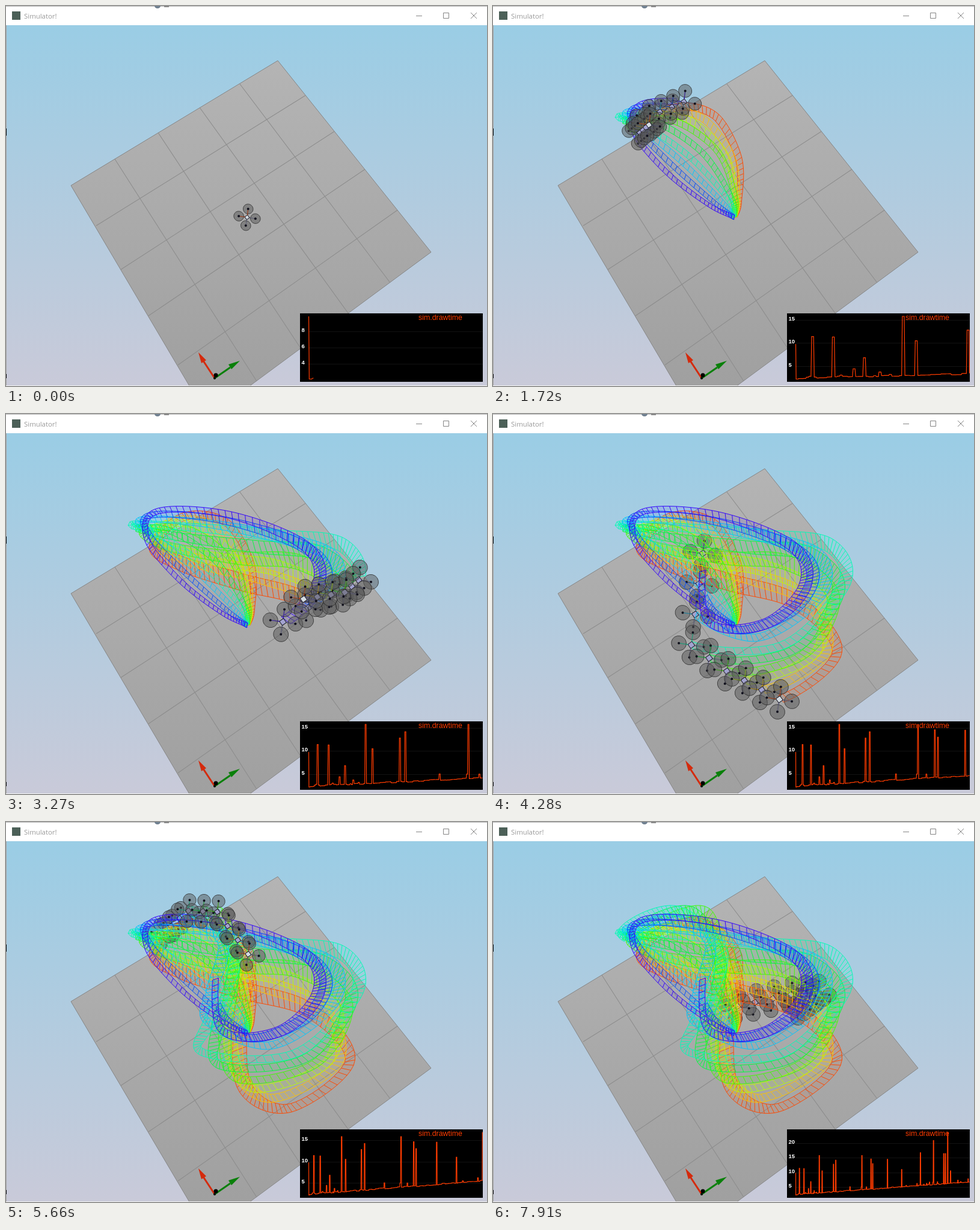
Animation of 800x633 px, one loop 7.99 s. Source, as an HTML page with a canvas:

```html
<!DOCTYPE html>
<html lang="en">
<head>
<meta charset="utf-8">
<title>Simulator</title>
<style>
  html, body { margin: 0; width: 100%; height: 100%; overflow: hidden; background: #fff; }
  svg, canvas { position: absolute; left: 0; top: 0; width: 800px; height: 633px; }
</style>
</head>
<body>
<svg viewBox="0 0 800 633">
  <defs>
    <linearGradient id="sky" x1="0" y1="0" x2="0" y2="1">
      <stop offset="0" stop-color="#9acde5"/><stop offset="1" stop-color="#c9cad9"/>
    </linearGradient>
    <linearGradient id="floor" x1="0" y1="0" x2="0" y2="1">
      <stop offset="0" stop-color="#b4b4b4"/><stop offset="1" stop-color="#9e9e9e"/>
    </linearGradient>
  </defs>
  <rect width="800" height="633" fill="#fff"/>
  <path d="M0 .5H800" stroke="#b5b5b5"/>
  <path d="M247 0a5 4 0 0 0 10 0z" fill="#708090"/>
  <path d="M263 1h8" stroke="#888" stroke-width="2"/>
  <rect x="10" y="9" width="14" height="14" fill="#4c6058"/>
  <text x="30" y="21" font-family="'Open Sans', sans-serif" font-size="11.4" fill="#999">Simulator!</text>
  <path d="M682 16.5h10M727.5 11.5h9v9h-9zM773 11l10 10M783 11l-10 10" fill="none" stroke="#858585"/>
  <rect y="32" width="800" height="600" fill="url(#sky)"/>
  <path d="M452 91L707 410L335.500 684.600L108 299Z" fill="url(#floor)" stroke="#858585"/>
  <path d="M389 130L639 461M322 169L570 513M253 211L490 570M181 255L417 625
           M150 366L498 149M191 439L546 209M237 516L597 272M286 598L651 340" fill="none" stroke="#8d8d8d" stroke-width="1.100"/>
  <path d="M347 620L328 591" stroke="#d42a0c" stroke-width="3"/>
  <path d="M320 577L333 590L325 595Z" fill="#d42a0c"/>
  <path d="M347 620L373 602" stroke="#0a800a" stroke-width="3"/>
  <path d="M389 591L375 605L370 597Z" fill="#0a800a"/>
  <circle cx="349" cy="615" r="3.500"/><circle cx="347" cy="620" r="2"/>
  <path d="M.5 32V632" stroke="#a5a5a5"/>
  <path d="M0 632.5H800" stroke="#f1f1f1"/>
  <path d="M0 204h1v12h-1zM0 613h1v7h-1z"/>
</svg>
<canvas id="view" width="800" height="633"></canvas>
<script>
const ctx = document.getElementById('view').getContext('2d');
const LOOP = 7990, STEP = 77.6, COUNT = 9;

// Waypoint times, then x,y waypoints for four flyers; the others blend between neighbours.
const times = [0, 350, 700, 1020, 1450, 1900, 2350, 2830, 3310, 3800, 4280, 4740, 5200, 5660, 6290, 6920, 7410, 7910];
const routes = [
  { id: 0, p: [401,352, 409,325, 408,252, 368,182, 296,171, 246,221, 293,250, 392,280, 505,314, 572,398, 474,476, 398,442, 390,330, 403,221, 328,167, 252,237, 315,270, 406,307] },
  { id: 3, p: [401,352, 402,316, 372,240, 300,191, 228,197, 275,222, 387,240, 490,248, 566,305, 515,402, 387,428, 364,355, 376,252, 352,150, 242,191, 290,222, 390,254, 495,288] },
  { id: 5, p: [401,352, 391,322, 328,252, 258,203, 210,184, 312,189, 455,203, 560,219, 583,285, 480,386, 328,384, 340,328, 381,220, 304,148, 214,187, 326,218, 432,238, 540,285] },
  { id: 8, p: [401,352, 357,330, 288,276, 235,210, 252,162, 376,169, 500,222, 518,288, 452,350, 358,345, 349,230, 350,182, 316,151, 260,186, 262,218, 362,235, 435,266, 510,307] }
];
const widths = [10, 9, 11, 12, 13, 16, 24, 28, 24, 16, 14, 24, 22, 20, 16, 16, 16, 16];
const arms = [14, 15, 16, 17, 18, 19, 20, 21, 21, 21, 21, 20, 18, 18, 19, 20, 20, 20];

// Cubic Hermite spline through get(k) at times[k].
function spline(get, t) {
  const last = times.length - 1;
  t = Math.min(t, times[last]);
  let k = 0;
  while (k < last - 1 && t > times[k + 1]) k++;
  const slope = n => {
    const a = Math.max(n - 1, 0), b = Math.min(n + 1, last);
    return (get(b) - get(a)) / (times[b] - times[a]);
  };
  const h = times[k + 1] - times[k], u = (t - times[k]) / h, v = 1 - u;
  return v * v * (1 + 2 * u) * get(k) + u * u * (1 + 2 * v) * get(k + 1)
    + h * u * v * (v * slope(k) - u * slope(k + 1));
}

function position(i, t) {
  const n = routes.findIndex((r, k) => k > 0 && i <= r.id);
  const a = routes[n - 1], b = routes[n], f = (i - a.id) / (b.id - a.id);
  const coord = o => spline(k => a.p[2 * k + o] * (1 - f) + b.p[2 * k + o] * f, t);
  return [coord(0), coord(1)];
}

const hue = (i, light = 50) => `hsl(${17 + 29.3 * i}, 95%, ${light}%)`;

// Ribbon edges at regular moments, computed once.
const RUNG = 38;
const ribbons = Array.from({ length: COUNT }, (_, i) => {
  const end = i > 6 ? 4150 : 6400, list = [];
  for (let t = 0; t < end; t += RUNG) {
    const [x, y] = position(i, t);
    const [ax, ay] = position(i, Math.max(t - 20, 0)), [bx, by] = position(i, t + 20);
    const d = Math.hypot(bx - ax, by - ay) || 1, tx = (bx - ax) / d, ty = (by - ay) / d;
    const w = spline(k => widths[k], t) * (1 - 0.035 * i) / 2;
    const ox = (0.4 * tx - ty) * w, oy = (0.4 * ty + tx) * w;
    list.push([x + ox, y + oy, x - ox, y - oy]);
  }
  return list;
});

function drawRibbon(i, t) {
  const pts = ribbons[i].slice(0, Math.floor(t / RUNG) + 1);
  if (pts.length < 2) return;
  const edges = new Path2D(), area = new Path2D();
  pts.forEach((p, k) => {
    edges.moveTo(p[0], p[1]);
    edges.lineTo(p[2], p[3]);
    if (!k) return;
    const q = pts[k - 1];
    edges.moveTo(q[0], q[1]); edges.lineTo(p[0], p[1]);
    edges.moveTo(q[2], q[3]); edges.lineTo(p[2], p[3]);
    area.moveTo(q[0], q[1]);
    area.lineTo(p[0], p[1]); area.lineTo(p[2], p[3]); area.lineTo(q[2], q[3]);
  });
  ctx.fillStyle = ctx.strokeStyle = hue(i);
  ctx.globalAlpha = 0.09;
  ctx.fill(area);
  ctx.globalAlpha = 1;
  ctx.lineWidth = 1;
  ctx.stroke(edges);
}

function drawDrone(i, t) {
  const [x, y] = position(i, t);
  const arm = spline(k => arms[k], t);
  const tips = [188, 277, 9, 99].map(a => {
    const r = a * Math.PI / 180;
    return [x + arm * Math.cos(r), y + arm * Math.sin(r)];
  });
  tips.forEach(([px, py], k) => {
    ctx.beginPath();
    ctx.moveTo(x, y);
    ctx.lineTo(px, py);
    ctx.lineWidth = k < 2 ? 1.4 : arm / 9;
    ctx.strokeStyle = k < 2 ? hue(i, 42) : 'rgba(82,82,135,.55)';
    ctx.stroke();
  });
  ctx.lineWidth = 1;
  tips.forEach(([px, py]) => {
    ctx.beginPath();
    ctx.ellipse(px, py, arm * 0.6, arm * 0.58, 0.6, 0, 7);
    ctx.fillStyle = 'rgba(88,88,88,.5)';
    ctx.fill();
    ctx.strokeStyle = 'rgba(40,40,40,.75)';
    ctx.stroke();
    ctx.beginPath();
    ctx.arc(px, py, 2, 0, 7);
    ctx.fillStyle = '#10101c';
    ctx.fill();
  });
  ctx.save();
  ctx.translate(x, y);
  ctx.rotate(0.95);
  const s = arm * 0.4;
  ctx.fillStyle = i ? '#a3a3d0' : '#d5dce2';
  ctx.strokeStyle = '#20202c';
  ctx.fillRect(-s / 2, -s / 2, s, s);
  ctx.strokeRect(-s / 2, -s / 2, s, s);
  ctx.restore();
}

// Draw-time graph: [moment, value] peaks over a slowly rising floor.
const peaks = [[154, 11.4], [374, 11.3], [576, 4.4], [680, 6.8], [838, 3.7], [1073, 15.8], [1195, 10.5],
  [1724, 12.8], [1815, 14.2], [3020, 15.8], [3420, 14.6], [3515, 13], [4180, 14.5], [4830, 11],
  [5700, 16.8], [6285, 21], [6755, 16.5], [6830, 16.5], [6950, 23.8], [7060, 10.5]];
const SAMPLE = 26, LOW = 2.15;
const noise = n => { const s = Math.sin(n * 127.1 + 3) * 43758.5; return s - Math.floor(s); };
const values = Array.from({ length: 310 }, (_, n) => {
  const t = n * SAMPLE, r = noise(n);
  return 2.2 + t * 0.00055 + 0.3 * noise(Math.floor(n / 4) + 500) + (r > 0.93 ? (r - 0.93) * 18 : 0);
});
for (const [t, v] of peaks) values[Math.round(t / SAMPLE)] = v;
values[0] = LOW;

function drawGraph(t) {
  const now = t + 37, scale = 289 / Math.max(now, 1333);
  const shown = values.slice(0, Math.floor(now / SAMPLE) + 1);
  const top = Math.max(9.8, ...shown);
  const yOf = v => 517 + (top - v) / (top - LOW) * 104.5;
  ctx.fillStyle = '#000';
  ctx.fillRect(489, 512, 304, 114);
  ctx.lineWidth = 1;
  ctx.font = 'bold 9.5px "Liberation Sans", Arial, sans-serif';
  ctx.textBaseline = 'middle';
  const tick = top > 11 ? 5 : 2;
  for (let v = tick === 2 ? 4 : 5; v < top - 0.3; v += tick) {
    const y = Math.round(yOf(v)) + 0.5;
    ctx.strokeStyle = '#242424';
    ctx.setLineDash([1, 1]);
    ctx.beginPath();
    ctx.moveTo(503, y);
    ctx.lineTo(793, y);
    ctx.stroke();
    ctx.setLineDash([]);
    ctx.fillStyle = '#fff';
    ctx.fillText(v, 491.5, y - 2.5);
  }
  ctx.strokeStyle = ctx.fillStyle = '#ff3c00';
  ctx.lineWidth = 1.2;
  ctx.beginPath();
  ctx.moveTo(503.5, yOf(9.8));
  shown.forEach((v, n) => {
    const xOf = m => 503.5 + Math.min(m, now) * scale;
    ctx.lineTo(xOf(n * SAMPLE + 4), yOf(v));
    ctx.lineTo(xOf(n * SAMPLE + 23), yOf(v));
  });
  ctx.stroke();
  ctx.font = '12.4px "Liberation Sans", Arial, sans-serif';
  ctx.fillText('sim.drawtime', 686, 519.5);
}

function draw(t) {
  ctx.clearRect(0, 0, 800, 633);
  const behind = i => t > 6000 || (t > 4000 && i > 5);
  const drones = test => {
    for (let i = t ? COUNT - 1 : 0; i >= 0; i--) if (test(i)) drawDrone(i, t);
  };
  drones(behind);
  for (let i = 0; i < COUNT; i++) drawRibbon(i, t);
  drones(i => !behind(i));
  drawGraph(t);
}

let shownStep = -1;
function tick() {
  const step = Math.floor((performance.now() % LOOP + 10) / STEP);
  if (step !== shownStep) draw((shownStep = step) * STEP);
  requestAnimationFrame(tick);
}
tick();
</script>
</body>
</html>
```
